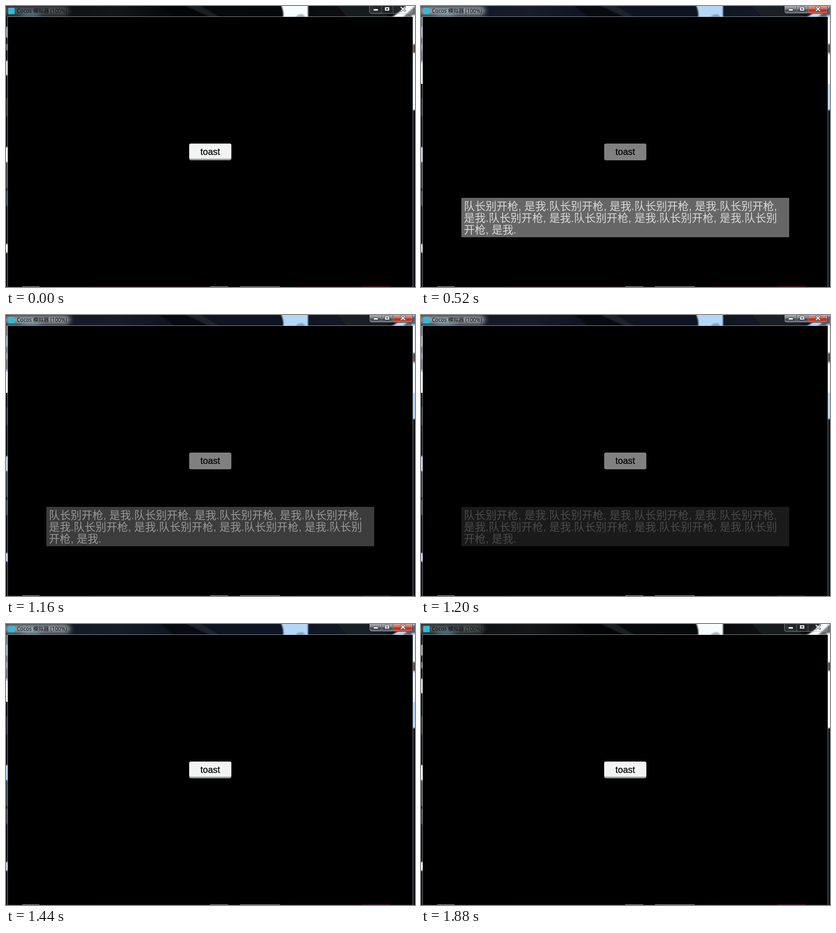
An HTML page that plays this animation: 902x621 px, repeating every 1.92 s.

```html
<!DOCTYPE html>
<html lang="zh">
<head>
<meta charset="utf-8">
<title>Toast</title>
<style>
html, body { margin: 0; width: 100%; height: 100%; overflow: hidden; background: #000; }
svg { display: block; width: 902px; height: 621px; }
text { white-space: pre; }

.title { font: 11.7px "Open Sans", "Noto Sans CJK SC", "Noto Sans CJK", sans-serif; }
.label { font: 20px "Liberation Sans", Arial, sans-serif; text-anchor: middle; stroke: #000; stroke-width: .3px; }
.msg { font: 24px "Liberation Sans", "Noto Sans CJK SC", "Noto Sans CJK", sans-serif; fill: #d8d8d8; }

.glass, .on, .off, .up, .down, .fade, .hover { animation: 1920ms step-end infinite; }
.glass { animation-name: tint; }
.on { animation-name: active; }
.off { animation-name: inactive; }
.up { animation-name: released; }
.down { animation-name: pressed; }
.fade { animation-name: toast; }
.hover { animation-name: hover; }

@keyframes tint {
  0%, 97.916%, 100% { color: #f6fcff; }
  25% { color: #b4d6f8; }
}
@keyframes active {
  0%, 97.916%, 100% { opacity: 0; }
  25% { opacity: 1; }
}
@keyframes inactive {
  0%, 97.916%, 100% { opacity: 1; }
  25% { opacity: 0; }
}
@keyframes released {
  0%, 75%, 100% { opacity: 1; }
  15.625% { opacity: 0; }
}
@keyframes pressed {
  0%, 75%, 100% { opacity: 0; }
  15.625% { opacity: 1; }
}
@keyframes toast {
  0%, 64.583%, 100% { opacity: 0; }
  27.083% { opacity: 1; }
  58.333% { opacity: .92; animation-timing-function: steps(5, end); }
  63.541% { opacity: .087; }
}
@keyframes hover {
  0%, 97.916%, 100% { opacity: 0; }
  86.458% { opacity: .4; }
  87.5% { opacity: .75; }
}
</style>
</head>
<body>
<svg viewBox="0 0 902 621">
  <defs>
    <filter id="soft" x="-20%" y="-60%" width="140%" height="220%"><feGaussianBlur stdDeviation="1.6"/></filter>
    <filter id="haze" x="-30%" y="-100%" width="160%" height="300%"><feGaussianBlur stdDeviation="6"/></filter>
    <linearGradient id="bar">
      <stop offset="0" stop-color="#1c2225"/>
      <stop offset=".17" stop-color="#0f1214"/>
      <stop offset=".27" stop-color="#131517"/>
      <stop offset=".38" stop-color="#07090b"/>
      <stop offset=".66" stop-color="#05080a"/>
      <stop offset=".82" stop-color="#0c0e10"/>
      <stop offset="1" stop-color="#0a0c0e"/>
    </linearGradient>
    <linearGradient id="grey" x2="0" y2="1">
      <stop offset="0" stop-color="#a9adb2"/>
      <stop offset=".46" stop-color="#797e84"/>
      <stop offset=".5" stop-color="#3c4148"/>
      <stop offset="1" stop-color="#6b727a"/>
    </linearGradient>
    <linearGradient id="red" x2="0" y2="1">
      <stop offset="0" stop-color="#e3a296"/>
      <stop offset=".46" stop-color="#cb6251"/>
      <stop offset=".5" stop-color="#b0291b"/>
      <stop offset="1" stop-color="#cf5a40"/>
    </linearGradient>
    <radialGradient id="glow" cy=".7">
      <stop offset="0" stop-color="#ffc38c"/>
      <stop offset="1" stop-color="#ee4a2c" stop-opacity=".45"/>
    </radialGradient>
    <path id="cross" d="M871.5 3L879.5 10.5M879.5 3L871.5 10.5"/>
  </defs>

  <!-- blurred desktop behind the window frame -->
  <rect width="902" height="621" fill="#0b0e12"/>
  <rect width="902" height="24" fill="url(#bar)"/>
  <g class="glass">
    <g class="on">
      <rect width="902" height="24" fill="#1c2a44" opacity=".4"/>
      <rect y="24" width="5" height="148" fill="#6d757d"/>
    </g>
    <g filter="url(#soft)">
      <path d="M335 -3H392L460 27H375Z" fill="#000" opacity=".5"/>
      <path d="M392 -3H425L475 27H455Z" fill="#2a2f34" opacity=".6"/>
      <path d="M728 -3H800L850 27H755Z" fill="#202326" opacity=".6"/>
      <path d="M605 -5H666V28H611Q614 12 605 -5Z" fill="currentColor"/>
      <path d="M637 28Q640 18 652 18Q660 19 660 28Z" fill="#5b6b7b" opacity=".55"/>
      <path d="M845 28Q868 16 884 -3H906L872 28Z" fill="currentColor"/>
      <path d="M872 28L906 -3V28Z" fill="currentColor" opacity=".4"/>
    </g>
    <g filter="url(#soft)" fill="currentColor">
      <rect x="-4" y="46" width="9" height="24" opacity=".6"/>
      <rect x="-4" y="84" width="9" height="14" opacity=".4"/>
      <rect x="-4" y="121" width="9" height="32" opacity=".85"/>
      <rect x="-4" y="204" width="9" height="40" opacity=".15"/>
      <rect x="-4" y="312" width="9" height="33"/>
      <rect x="-4" y="345" width="9" height="58" opacity=".25"/>
      <rect x="-4" y="408" width="9" height="34" fill="#456078" opacity=".7"/>
      <rect x="-4" y="526" width="9" height="19"/>
      <rect x="895" y="20" width="11" height="64"/>
      <rect x="895" y="104" width="11" height="126"/>
      <rect x="895" y="84" width="11" height="20" fill="#5a4a44"/>
    </g>
    <g class="on">
      <rect y="126" width="4" height="46" fill="#edf2f6"/>
      <rect x="897" y="24" width="5" height="58" fill="#eef3f8"/>
      <rect x="897" y="108" width="5" height="64" fill="#f2f5f8"/>
    </g>
  </g>

  <!-- title bar -->
  <g filter="url(#haze)">
    <rect x="-5" y="3" width="142" height="15" rx="7" fill="#71787c" opacity=".75"/>
    <ellipse cx="54" cy="21" rx="22" ry="4" fill="#58a5bd" opacity=".7"/>
    <rect class="on" x="-5" y="2" width="146" height="17" rx="8" fill="#a4acb0" opacity=".6"/>
  </g>
  <rect x="5" y="4" width="14" height="14" fill="#35b9d8"/>
  <text class="title" x="24" y="15" fill="#050607">Cocos 模拟器 (100%)</text>

  <!-- window controls -->
  <g class="off">
    <path d="M801.5 -1V12Q801.5 16.5 806 16.5H892Q896.5 16.5 896.5 12V-1Z" fill="#fff" fill-opacity=".1" stroke="#a2abb0" stroke-opacity=".7"/>
    <path d="M828.5 0V16M853.5 0V16" stroke="#a2abb0" stroke-opacity=".5"/>
  </g>
  <g class="on">
    <path d="M802 0H854V16H806Q802 16 802 12Z" fill="url(#grey)"/>
    <path d="M854 0H897V12Q897 16 893 16H854Z" fill="url(#red)"/>
    <path d="M801.5 -1V12Q801.5 16.5 806 16.5H892Q896.5 16.5 896.5 12V-1M828.5 0V16M853.5 0V16" fill="none" stroke="#20252b"/>
    <path d="M802.5 0V12Q803 15.5 806 15.5H827.5V0M829.5 0V15.5H852.5V0M854.5 0V15.5H892Q895.5 15 895.5 12V0" fill="none" stroke="#fff" stroke-opacity=".35"/>
  </g>
  <g class="hover">
    <rect x="847" y="0" width="55" height="22" rx="7" fill="#f0603c" opacity=".35" filter="url(#soft)"/>
    <path d="M854 0H897V12Q897 16 893 16H854Z" fill="url(#glow)"/>
  </g>
  <g fill="#fff" stroke="#41464d">
    <rect x="810.5" y="6.5" width="10" height="4"/>
    <path fill-rule="evenodd" d="M835.5 2.5H845.5V10.5H835.5ZM838.5 5.5H842.5V7.5H838.5Z"/>
  </g>
  <g stroke-linecap="square">
    <use href="#cross" stroke="#454a50" stroke-width="4"/>
    <use href="#cross" stroke="#fff" stroke-width="2"/>
  </g>

  <!-- client area with a translucent edge -->
  <path d="M3.5 621V23.5H897.5V621" fill="none" stroke="#e8f2f6" stroke-opacity=".6"/>
  <rect x="4" y="24" width="893" height="597"/>
  <path d="M4 620.5H897" stroke="#14181c"/>
  <g stroke="#c3ccd2">
    <path d="M36 620.5H74M450 620.5H490M516 620.5H604"/>
    <path d="M190 620.5H440M640 620.5H780" stroke="#35101f"/>
    <path d="M785 620.5H848" stroke="#8c1740"/>
  </g>

  <!-- button -->
  <g class="up">
    <rect x="404" y="304" width="93" height="37" rx="4" fill="#999"/>
    <path d="M404 308Q404 304 408 304H493Q497 304 497 308V334Q497 337.5 493.5 337.5H407.5Q404 337.5 404 334Z" fill="#f2f3f3"/>
  </g>
  <rect class="down" x="404" y="304" width="93" height="37" rx="4" fill="#808080"/>
  <text class="label" x="450.5" y="329">toast</text>

  <!-- toast -->
  <rect class="fade" x="89" y="424" width="723" height="87" fill="#666"/>
  <g class="fade msg">
    <text x="94.5" y="451">队长别开枪, 是我.队长别开枪, 是我.队长别开枪, 是我.队长别开枪,</text>
    <text x="94.5" y="477">是我.队长别开枪, 是我.队长别开枪, 是我.队长别开枪, 是我.队长别</text>
    <text x="94.5" y="503">开枪, 是我.</text>
  </g>
</svg>
</body>
</html>
```
